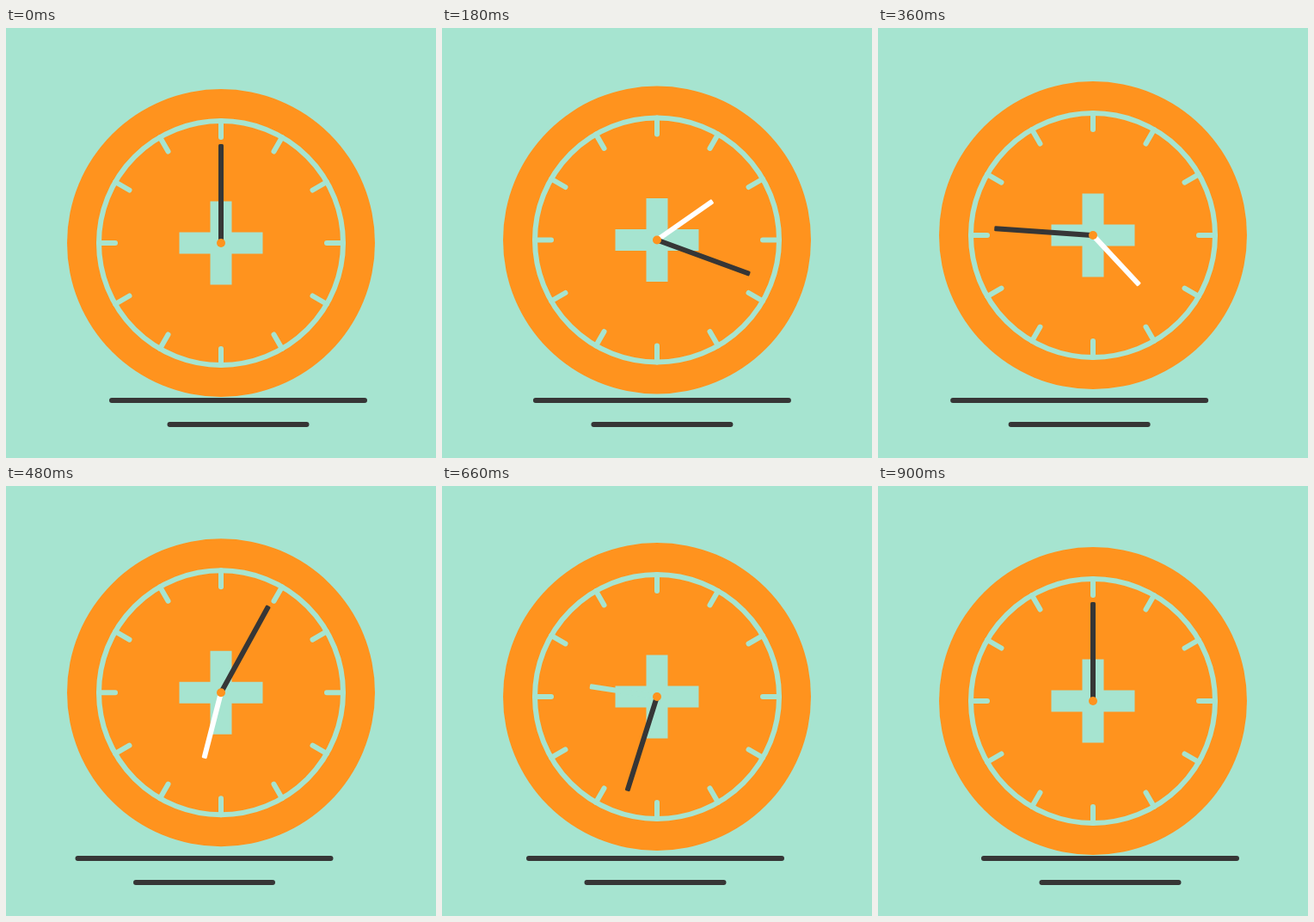
An HTML page that plays this animation: 500 by 500 pixels, repeating every 930 ms.

```html
<!DOCTYPE html>
<html lang="en">
<head>
<meta charset="utf-8">
<title>Clock</title>
<style>
  html, body { margin: 0; width: 100%; height: 100%; overflow: hidden; background: #a6e4d0; }
  svg { display: block; width: 100%; height: 100%; }
</style>
</head>
<body>
<svg viewBox="0 0 500 500">
  <g id="ground" stroke="#363636" stroke-width="6" stroke-linecap="round">
    <path d="M123 433H417M190.5 461H349.5"/>
  </g>
  <g id="clock">
    <circle r="179" fill="#ff931e"/>
    <g id="dial" fill="none" stroke="#a6e4d0" stroke-width="6" stroke-linecap="round">
      <circle r="142"/>
    </g>
    <path d="M-48.5 0H48.5M0 -48.5V48.5" stroke="#a6e4d0" stroke-width="25"/>
    <rect id="hour" x="-3" y="-79" width="6" height="79" rx="1.5"/>
    <rect id="minute" x="-3" y="-115" width="6" height="115" rx="1.5" fill="#363636"/>
    <circle r="5" fill="#ff931e"/>
  </g>
</svg>
<script>
const LOOP = 930, STEP = 30, TURN = 900, HALF = TURN / 2;
const $ = id => document.getElementById(id);
const [ground, clock, dial, hour, minute] =
  ['ground', 'clock', 'dial', 'hour', 'minute'].map($);

for (let i = 0; i < 12; i++) {
  const tick = document.createElementNS('http://www.w3.org/2000/svg', 'path');
  tick.setAttribute('d', 'M0 -142V-123');
  tick.setAttribute('transform', `rotate(${i * 30})`);
  dial.append(tick);
}

// Cubic Bezier easing with level ends: control points (x1, 0) and (x2, 1).
function ease(x, x1, x2) {
  let lo = 0, hi = 1;
  for (let i = 0; i < 24; i++) {
    const u = (lo + hi) / 2, v = 1 - u;
    if (3 * u * v * (v * x1 + u * x2) + u ** 3 < x) lo = u; else hi = u;
  }
  return lo * lo * (3 - 2 * lo);
}

function draw(ms) {
  const t = Math.floor((ms % LOOP) / STEP) * STEP;
  const rising = t <= HALF;
  const swing = ease(1 - Math.abs(t - HALF) / HALF, 1 / 3, 2 / 3);
  const lift = rising ? swing : 1 - ease((t - HALF) / HALF, 1 / 4, 2 / 3);
  const angle = 360 * ease(t / TURN, 1 / 6, 5 / 6);

  ground.setAttribute('transform', `translate(${-40 * swing})`);
  clock.setAttribute('transform', `translate(250 ${250 - 10 * lift})`);
  hour.setAttribute('transform', `rotate(${angle})`);
  hour.setAttribute('fill', t >= 180 && t < 570 ? '#fff' : '#a6e4d0');
  minute.setAttribute('transform', `rotate(${2 * angle})`);
}

const start = performance.now();
function frame() {
  draw(performance.now() - start);
  requestAnimationFrame(frame);
}
frame();
</script>
</body>
</html>
```
